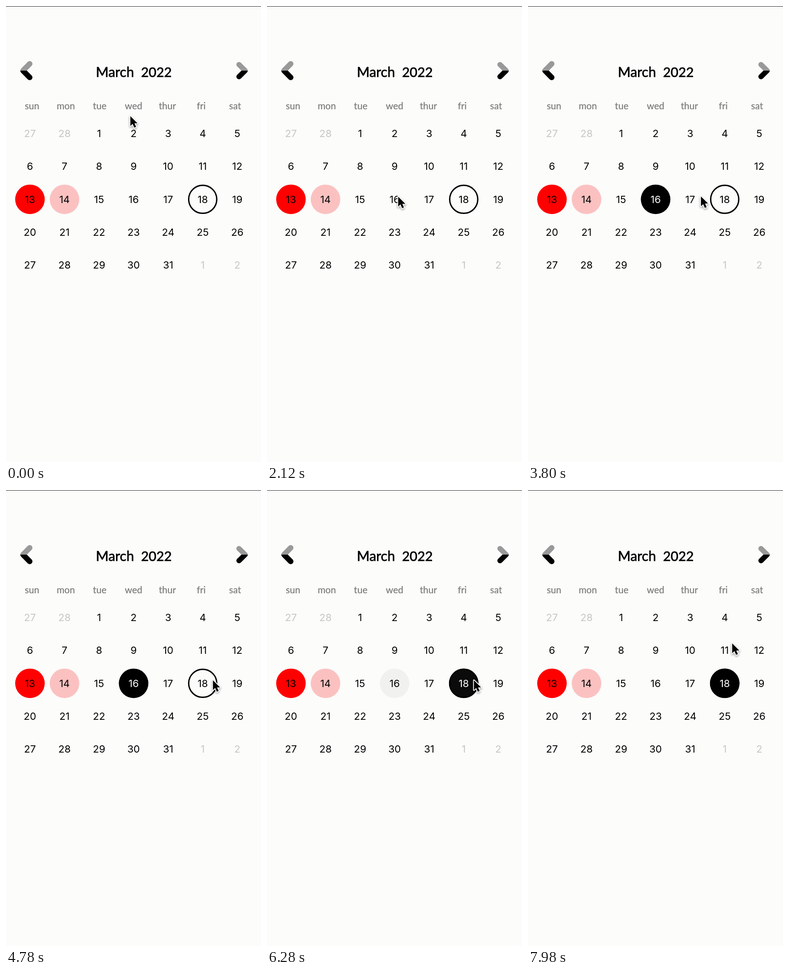
Write an HTML page with a canvas that moves like this. It is 559x1002 px and loops after 8000 ms.

```html
<!DOCTYPE html>
<html lang="en">
<head>
<meta charset="utf-8">
<title>Calendar</title>
<style>
  html, body { margin: 0; width: 100%; height: 100%; overflow: hidden; background: #fcfcfa; }
  canvas { display: block; width: 559px; height: 1002px; }
</style>
</head>
<body>
<canvas id="stage" width="559" height="1002"></canvas>
<script>
const ctx = document.getElementById('stage').getContext('2d');
const LOOP = 8000, FADE = 820, PICK_16 = 2640, PICK_18 = 5562;
const PAPER = '#fcfcfa';
const HAND = 'Lato, "Open Sans", sans-serif';
const DIGITS = '22px Inter, Roboto, sans-serif';
const WEEK = ['sun', 'mon', 'tue', 'wed', 'thur', 'fri', 'sat'];

// Pointer stops: time, x, y
const STOPS = [
  [0, 271, 240], [60, 271, 240], [720, 342, 456], [1250, 342, 456],
  [2020, 286, 417], [3240, 286, 417], [4290, 452, 416], [6750, 452, 416],
  [7700, 446, 335], [LOOP, 446, 335]
];

const ease = u => { u = Math.min(1, Math.max(0, u)); return u * u * (3 - 2 * u); };
const dayX = i => 52.5 + 75.75 * (i % 7);
const dayY = i => 280 + 72.4 * Math.floor(i / 7);

// A positive weight thickens the letters with a thin outline
function text(str, x, y, font, color, align = 'center', weight = 0) {
  ctx.font = font;
  ctx.fillStyle = ctx.strokeStyle = color;
  ctx.textAlign = align;
  ctx.fillText(str, x, y);
  if (weight) {
    ctx.lineWidth = weight;
    ctx.lineJoin = 'round';
    ctx.strokeText(str, x, y);
  }
}

function disc(i, color, alpha = 1) {
  if (alpha <= 0) return;
  ctx.globalAlpha = alpha;
  ctx.fillStyle = color;
  ctx.beginPath();
  ctx.arc(dayX(i), dayY(i), 32.4, 0, 7);
  ctx.fill();
  ctx.globalAlpha = 1;
}

// Two-tone chevron: grey above the middle line, black below
function chevron(tip, end, rise, width) {
  const mid = 142;
  for (const [top, color] of [[mid - 40, '#999'], [mid, '#000']]) {
    ctx.save();
    ctx.beginPath();
    ctx.rect(0, top, 559, 40);
    ctx.clip();
    ctx.beginPath();
    ctx.moveTo(end, mid - rise);
    ctx.lineTo(tip, mid);
    ctx.lineTo(end, mid + rise);
    ctx.lineWidth = width;
    ctx.lineCap = ctx.lineJoin = 'round';
    ctx.strokeStyle = color;
    ctx.stroke();
    ctx.restore();
  }
}

function pointer(t) {
  const k = STOPS.findIndex(s => s[0] > t);
  const [t0, x0, y0] = STOPS[k - 1], [t1, x1, y1] = STOPS[k];
  const u = ease((t - t0) / (t1 - t0));
  ctx.save();
  ctx.translate(x0 + (x1 - x0) * u, y0 + (y1 - y0) * u);
  ctx.scale(1.05, 1.05);
  const arrow = new Path2D('M1.5 2V22.5L6.2 18.2L9.7 26L13.5 24.4L10.1 16.8H16.5Z');
  ctx.lineJoin = 'round';
  ctx.lineWidth = 3.4;
  ctx.strokeStyle = '#fff';
  ctx.shadowColor = 'rgba(0,0,0,.4)';
  ctx.shadowBlur = 4;
  ctx.shadowOffsetY = 2;
  ctx.stroke(arrow);
  ctx.shadowColor = 'transparent';
  ctx.fillStyle = '#000';
  ctx.fill(arrow);
  ctx.restore();
}

function draw(t) {
  ctx.fillStyle = PAPER;
  ctx.fillRect(0, 0, 559, 1002);
  ctx.fillStyle = '#222';
  ctx.fillRect(0, 0, 559, 1);

  chevron(37.3, 52, 15, 12);
  chevron(524.3, 510.7, 13.3, 11.4);
  text('March', 197, 156, '30px ' + HAND, '#000', 'left', 0.7);
  text('2022', 296, 156, '29px ' + HAND, '#000', 'left', 0.7);
  WEEK.forEach((day, i) => text(day, 57 + 74.2 * i, 227, '20.5px ' + HAND, '#777', 'center', 0.2));

  const on16 = ease((t - PICK_16) / FADE), on18 = ease((t - PICK_18) / FADE);
  disc(14, '#f00');
  disc(15, '#fbc1c1');
  disc(17, '#000', on16 - on18);
  disc(19, '#000', on18);
  ctx.strokeStyle = '#000';
  ctx.lineWidth = 3;
  ctx.beginPath();
  ctx.arc(dayX(19), dayY(19), 30.8, 0, 7);
  ctx.stroke();

  // Labels swap colour at once when a day is picked
  const picked = t < PICK_16 ? 0 : t < PICK_18 ? 17 : 19;
  for (let i = 0; i < 35; i++) {
    const inMonth = i > 1 && i < 33;
    const num = i < 2 ? 27 + i : inMonth ? i - 1 : i - 32;
    const color = i === picked && picked ? PAPER : inMonth ? '#000' : '#c6c6c6';
    text(num, dayX(i), dayY(i) + 7.7, DIGITS, color);
  }
  pointer(t);
}

const start = performance.now();
function frame() {
  draw((performance.now() - start) % LOOP);
  requestAnimationFrame(frame);
}
frame();
</script>
</body>
</html>
```
